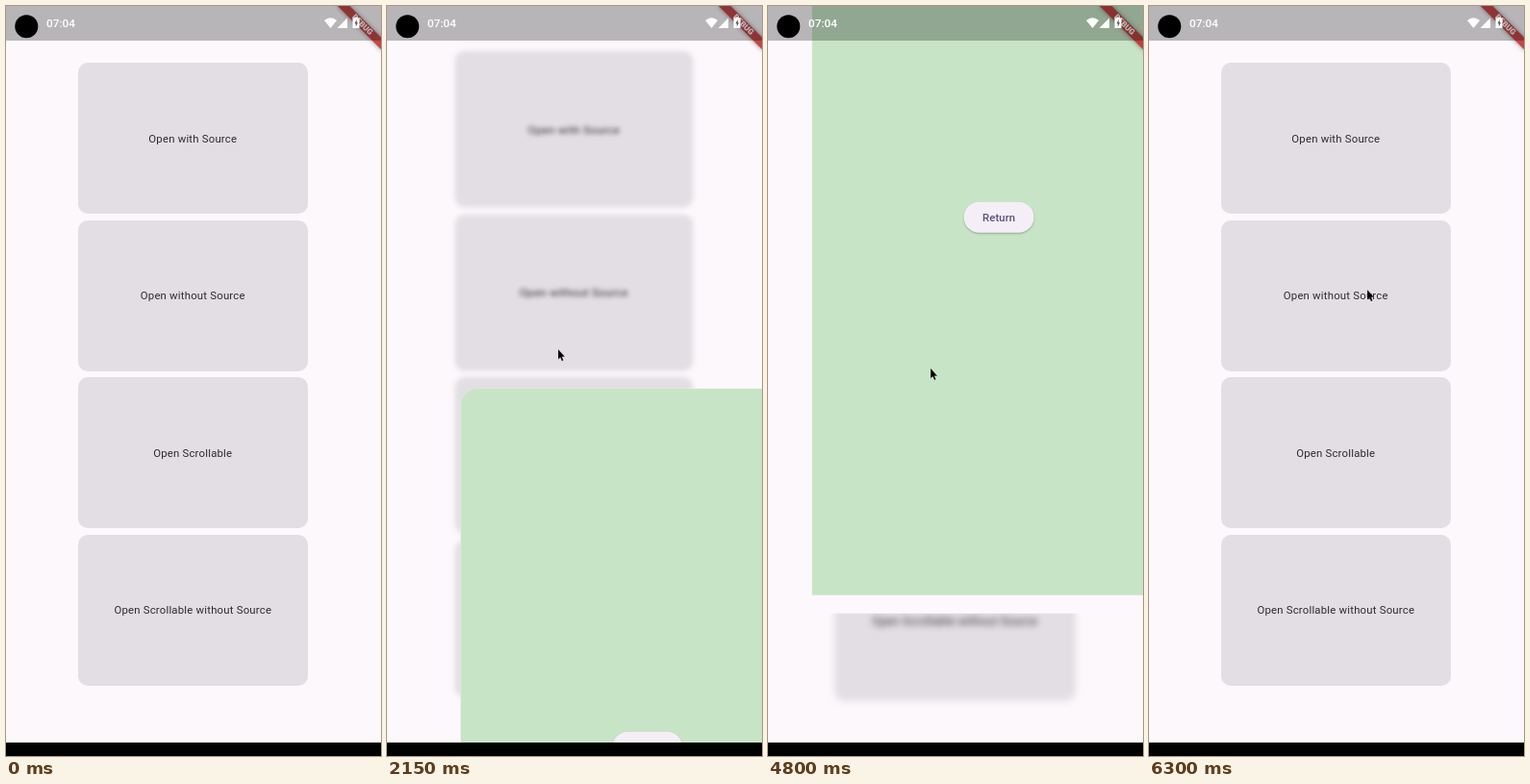
An HTML page for the animation above (6.35 s loop, 390x780 px).

```html
<!DOCTYPE html>
<html lang="en">
<head>
<meta charset="utf-8">
<title>Drag to dismiss</title>
<style>
html, body { margin: 0; width: 100%; height: 100%; overflow: hidden; }
body { font-family: Roboto, sans-serif; background: #fcf8fc; }
#stage { position: relative; width: 390px; height: 780px; overflow: hidden; background: #fcf8fc; }
#stage div, #stage svg { position: absolute; box-sizing: border-box; }
#home { inset: 0; transform-origin: 195px 390px; }
.card {
  left: 75px; width: 238.5px; height: 157px; border-radius: 10px; background: #e2dee3;
  color: #2d2a30; font-size: 11.37px; letter-spacing: .203px;
  display: flex; align-items: center; justify-content: center; white-space: nowrap;
}
#page { background: #fcf8fc; overflow: hidden; }
#green { left: 0; right: 0; top: 0; background: #c8e4c6; }
#button {
  left: 50%; top: 50%; width: 73px; height: 32px; margin: -26px 0 0 -37px; border-radius: 16px;
  background: #f4eff6; color: #5d4f7b; font-size: 11.37px; font-weight: 500; letter-spacing: .08px;
  line-height: 32px; text-align: center; box-shadow: 0 1px 2px rgba(0,0,0,.28);
}
#ribbon { left: 390px; top: 0; width: 0; height: 0; transform: rotate(45deg); }
#ribbon div {
  left: -32.5px; top: 22.7px; width: 65px; height: 9.8px; background: rgba(183,28,28,.8);
  box-shadow: 0 0 5px rgba(0,0,0,.4); color: #fff; font-size: 8.3px; font-weight: 900;
  line-height: 9.8px; text-align: center;
}
#bar { left: 0; top: 0; width: 390px; height: 36px; background: rgba(0,0,0,.27); }
#clock { left: 42px; top: 11px; color: #fff; font-size: 11.8px; font-weight: 500; line-height: 14px; }
#nav { left: 0; top: 766px; width: 390px; height: 14px; background: #000; }
</style>
</head>
<body>
<div id="stage">
  <div id="home"></div>
  <div id="page"><div id="green"><div id="button">Return</div></div></div>
  <div id="ribbon"><div>DEBUG</div></div>
  <div id="bar"></div>
  <div id="clock">07:04</div>
  <svg width="390" height="40" style="left:0;top:0">
    <circle cx="21.3" cy="21.3" r="12" fill="#000"/>
    <g fill="#fff">
      <path d="M331 15Q337.500 9.500 344 15L337.500 23Z"/>
      <path d="M355 12.500V23H344.500Z"/>
      <path d="M362.500 12.500V11.500H365.500V12.500H367.500V23H360.500V12.500Z"/>
    </g>
    <path d="M364.700 14L362.500 18.300H363.800V21.500L366 17.200H364.700Z" fill="#555"/>
  </svg>
  <div id="nav"></div>
  <svg id="cursor" width="12" height="16" style="left:0;top:0;overflow:visible">
    <path d="M0 0V10.500L2.300 8.400L3.900 12.200L5.500 11.500L3.900 7.800H7Z" fill="#000" stroke="#fff" stroke-opacity=".35" stroke-width=".5"/>
  </svg>
</div>
<script>
const LOOP = 6350, W = 390, H = 785, LIP = 19;
const $ = id => document.getElementById(id);
const [home, page, green, button, cursor] = ['home', 'page', 'green', 'button', 'cursor'].map($);
const labels = ['Open with Source', 'Open without Source', 'Open Scrollable', 'Open Scrollable without Source'];
const cardTop = i => 59 + 163.6 * i;

labels.forEach((label, i) => {
  const card = document.createElement('div');
  card.className = 'card';
  card.style.top = cardTop(i) + 'px';
  card.textContent = label;
  home.append(card);
});

// Rows: time, x, y
const pointer = [
  [250, 84, 387], [450, 182, 162], [600, 156, 179], [1600, 156, 179],
  [2000, 178, 357], [3200, 178, 357], [3350, 176, 229], [3600, 176, 229],
  [3900, 123, 520], [4500, 123, 530], [4800, 169, 377], [5050, 197, 341],
  [5300, 213, 320], [5800, 227, 295]
];

// from: starting rectangle; drag rows: time, x, y
const visits = [
  { open: 800, time: 350, from: [75, cardTop(0), 238.5, 157], fade: [2080, 2350],
    drag: [[1600, 0, 0], [2000, 22, 178], [2100, 70, 260], [2300, 95, 800]] },
  { open: 2550, time: 230, from: [75, cardTop(1), 238.5, 157], fade: [3380, 3580],
    drag: [[3200, 0, 0], [3350, -2, -128], [3510, -4, -800]] },
  { open: 3950, time: 300, from: [75, cardTop(2), 238.5, 157], fade: [5680, 6050],
    drag: [[4500, 0, 0], [4800, 45.500, -153], [5050, 68, -232], [5300, 77, -310], [5720, 91, -800]] }
];

const clamp = v => Math.min(1, Math.max(0, v));
const mix = (a, b, p) => a + (b - a) * p;
const easeOut = p => 1 - (1 - p) ** 3;

function at(rows, t) {
  const i = rows.findIndex(r => r[0] > t);
  if (i === 0) return rows[0].slice(1);
  if (i < 0) return rows[rows.length - 1].slice(1);
  const a = rows[i - 1], b = rows[i], p = (t - a[0]) / (b[0] - a[0]);
  return a.slice(1).map((v, k) => mix(v, b[k + 1], p));
}

function draw(t) {
  const visit = visits.find(v => t >= v.open && t < v.fade[1]);
  let depth = 0;
  page.style.display = visit ? 'block' : 'none';
  if (visit) {
    const p = easeOut(clamp((t - visit.open) / visit.time));
    const [dx, dy] = at(visit.drag, t);
    const [x, y, w, h] = visit.from.map((v, k) => mix(v, [0, 0, W, H][k], p));
    const radius = mix(10, 18 * clamp(Math.hypot(dx, dy) / 30), p);
    Object.assign(page.style, {
      width: w + 'px', height: h + 'px', borderRadius: radius + 'px',
      transform: `translate(${x + dx}px, ${y + dy}px)`, opacity: clamp(p * 2)
    });
    green.style.bottom = LIP * p + 'px';
    button.style.opacity = p;
    const [start, end] = visit.fade;
    depth = p * (1 - clamp((t - start) / (end - start)));
  }
  home.style.transform = `scale(${1 + .05 * depth})`;
  home.style.filter = depth ? `blur(${3.5 * depth}px)` : 'none';

  const [cx, cy] = at(pointer, t);
  cursor.style.display = t < 250 ? 'none' : 'block';
  cursor.style.transform = `translate(${cx}px, ${cy}px)`;
}

const began = performance.now();
function tick() {
  draw((performance.now() - began) % LOOP);
  requestAnimationFrame(tick);
}
tick();
</script>
</body>
</html>
```
